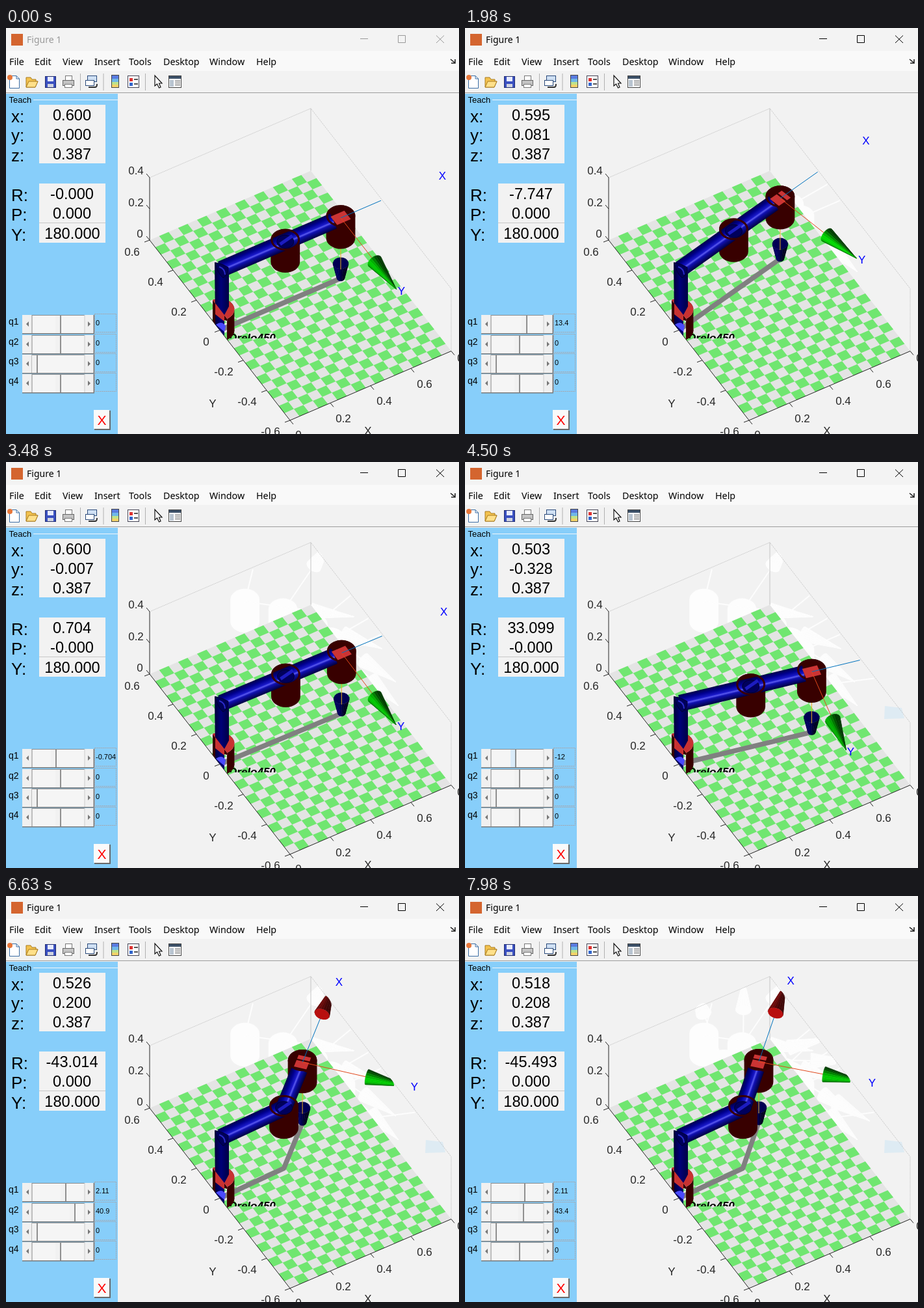
Animation of 697 by 624 pixels, one loop 8 s. Source, as an HTML page:

```html
<!DOCTYPE html>
<html lang="en">
<head>
<meta charset="utf-8">
<title>Figure 1</title>
<style>
html, body { margin: 0; width: 100%; height: 100%; overflow: hidden; background: #f2f2f2; }
svg { display: block; width: 697px; height: 624px; font-family: Arial, "Liberation Sans", sans-serif; }
.ui { font-family: "Segoe UI", "Open Sans", sans-serif; }
</style>
</head>
<body>
<svg viewBox="0 0 697 624">
  <defs>
    <linearGradient id="tube" x2="0" y2="1">
      <stop offset="0" stop-color="#000048"/>
      <stop offset=".25" stop-color="#000090"/>
      <stop offset=".48" stop-color="#1818c8"/>
      <stop offset=".56" stop-color="#5a5af0"/>
      <stop offset=".66" stop-color="#1010b0"/>
      <stop offset="1" stop-color="#000040"/>
    </linearGradient>
    <linearGradient id="column">
      <stop offset="0" stop-color="#000038"/>
      <stop offset=".45" stop-color="#000078"/>
      <stop offset="1" stop-color="#000044"/>
    </linearGradient>
    <clipPath id="plotClip"><rect x="172" y="101" width="525" height="523"/></clipPath>
    <clipPath id="nameClip"><rect x="342" y="464" width="90" height="13"/></clipPath>
  </defs>
  <rect width="697" height="624" fill="#f2f2f2"/>
  <g clip-path="url(#plotClip)">
    <g id="back"></g>
    <g id="floor"></g>
    <g id="robot"></g>
  </g>
  <g id="chrome"></g>
  <g id="panel"></g>
  <g id="live"></g>
</svg>
<script>
const LOOP = 8000, Z = 0.387, L1 = 0.325, L2 = 0.275;
const RAD = Math.PI / 180, SCALE = 358, TILT = 0.744;
const VIEW = [-0.337, -0.58, 0.743], LIGHT = [-0.85, -0.35, 0.39];
const TIP = 0.475, HEAD = 0.29, HEAD_R = 0.0335;

const layer = id => document.getElementById(id);
const project = (x, y, z = 0) => [329 + 310 * x - 180 * y, 464.5 - 133 * x - 230.8 * y - 240 * z];
const dot = (a, b) => a[0] * b[0] + a[1] * b[1] + a[2] * b[2];
const along = (o, d, t) => o.map((v, i) => v + d[i] * t);
const pts = list => list.map(p => p.map(v => v.toFixed(1)).join()).join(' ');
const poly = (list, fill, extra = '') => `<polygon points="${pts(list)}" fill="${fill}" ${extra}/>`;
const line = (list, color, width = 1, extra = '') =>
  `<polyline points="${pts(list)}" fill="none" stroke="${color}" stroke-width="${width}" ${extra}/>`;
const rect = (x, y, w, h, fill, extra = '') =>
  `<rect x="${x}" y="${y}" width="${w}" height="${h}" fill="${fill}" ${extra}/>`;
const text = (s, x, y, size, fill = '#000', anchor = 'start', extra = '') =>
  `<text x="${x}" y="${y}" font-size="${size}" fill="${fill}" text-anchor="${anchor}" ${extra}>${s}</text>`;
const path = (d, fill, extra = '') => `<path d="${d}" fill="${fill}" ${extra}/>`;

function track(keys, t) {
  let i = 1;
  while (i < keys.length && keys[i][0] <= t) i++;
  const [t0, a] = keys[i - 1], [t1, b] = keys[i] || [t0 + 1, a];
  return a + (b - a) * (t - t0) / (t1 - t0);
}

// Joint angles: [ms, degrees]. They trail the slider thumbs by one callback.
const Q1 = [[0, 0], [1440, 0], [1620, 7.747], [1890, 7.747], [1980, 13.4], [2340, 33], [2730, 33],
  [2820, 49.5], [3420, -0.704], [3570, -0.704], [4140, -36], [4260, -33.099], [4440, -33.099],
  [4500, -12], [4980, 2.113]];
const Q2 = [[0, 0], [6030, 0], [6540, 40.901], [6660, 53.4], [6870, 53.4], [7020, 57.5], [7530, 57.5],
  [7620, 75], [7860, 43.38]];
// [ms, right edge of the thumb]
const THUMB1 = [[0, 84], [1440, 84], [1680, 95], [1980, 95], [2340, 121], [2730, 121],
  [3450, 77], [3570, 77], [4110, 57], [4350, 74], [4500, 78], [4950, 92]];
const THUMB2 = [[0, 84], [6030, 84], [6600, 106], [6870, 106], [7110, 115], [7530, 115], [7950, 90]];
// White smears left behind: [ms, q1, q2]
const SMEARS = [[1620, 0, 0], [1980, 7.7, 0], [2820, 33, 0], [2940, 49.5, 0], [3300, 18, 0],
  [4500, -20, 0], [6660, 2.1, 20], [7620, 2.1, 57.5], [7740, 2.1, 75]];

function arm(q1, q2) {
  const a = q1 * RAD, b = (q1 + q2) * RAD;
  const elbow = [L1 * Math.cos(a), L1 * Math.sin(a), Z];
  const dirX = [Math.cos(b), Math.sin(b), 0];
  return { q1, q2, yaw: q1 + q2, elbow, tool: along(elbow, dirX, L2), dirX, dirY: [dirX[1], -dirX[0], 0] };
}

// The robot is redrawn at a coarse rate
function poseAt(t) {
  const s = Math.max(0, Math.floor((t - 60) / 120) * 120 + 60);
  return arm(track(Q1, s), track(Q2, s));
}

// Distance along d until the axes box ends
function reach(o, d, limit = TIP) {
  const lo = [0, -0.6, 0], hi = [0.8, 0.6, 0.45];
  return d.reduce((m, v, i) => Math.abs(v) < 1e-6 ? m : Math.min(m, ((v > 0 ? hi : lo)[i] - o[i]) / v), limit);
}

function cone(o, d, rgb, flat) {
  if (reach(o, d) <= HEAD) return '';
  const u = d[2] ? [1, 0, 0] : [-d[1], d[0], 0], w = d[2] ? [0, 1, 0] : [0, 0, 1], n = 18;
  const normal = k => u.map((v, i) => v * Math.cos(k * 2 * Math.PI / n) + w[i] * Math.sin(k * 2 * Math.PI / n));
  const apex = along(o, d, TIP), center = along(o, d, HEAD);
  const rim = k => along(center, normal(k), HEAD_R);
  const end = k => {
    const a = rim(k), side = apex.map((v, i) => v - a[i]);
    return along(a, side, Math.max(0, reach(a, side, 1)));
  };
  const tone = s => flat || `rgb(${rgb.map(v => Math.round(v * s))})`;
  let out = '';
  for (let k = 0; k < n; k++) {
    const m = normal(k + 0.5);
    if (dot(m, VIEW) < -0.15) continue;
    const c = tone(0.25 + 0.75 * Math.max(0, dot(m, LIGHT)) ** 2);
    out += poly([rim(k), rim(k + 1), end(k + 1), end(k)].map(p => project(...p)), c, `stroke="${c}" stroke-width=".5"`);
  }
  if (dot(d, VIEW) < 0) out += poly([...Array(n).keys()].map(k => project(...rim(k))), tone(0.75));
  return out;
}

const RIM = 22.4, MAROON = '#380000';
const rimRing = ([x, y], color, width) =>
  `<ellipse cx="${x}" cy="${y - 3}" rx="${RIM - width / 2}" ry="${RIM * TILT - width / 2}" fill="none" stroke="${color}" stroke-width="${width}"/>`;

function cylinder([x, y], fill) {
  const ry = RIM * TILT, top = y - 3, low = y + 31;
  return path(`M${x - RIM} ${top}A${RIM} ${ry} 0 0 1 ${x + RIM} ${top}V${low}A${RIM} ${ry} 0 0 1 ${x - RIM} ${low}Z`, fill);
}

function tube(a, b, cut = 0) {
  const dx = b[0] - a[0], dy = b[1] - a[1];
  return `<g transform="translate(${a}) rotate(${Math.atan2(dy, dx) / RAD})">` +
    rect(0, -12.7, Math.max(0, Math.hypot(dx, dy) - cut), 25.4, 'url(#tube)') + '</g>';
}

function smear(q1, q2) {
  const { tool, dirX, dirY } = arm(q1, q2), c = '#fdfdfd';
  return cylinder(project(...tool), c) + cone(tool, dirX, 0, c) + cone(tool, dirY, 0, c) +
    [dirX, dirY].map(d => line([project(...tool), project(...along(tool, d, reach(tool, d)))], c, 2)).join('');
}

function drawBack(t) {
  let out = SMEARS.filter(s => t >= s[0]).map(s => smear(s[1], s[2])).join('');
  if (t >= 4260) out += poly([[646, 375], [672, 378], [676, 394], [645, 395]], '#deebf3');
  const wall = [[0, 0.6, 0.4], [0.8, 0.6, 0.4], [0.8, -0.6, 0.4], [0.8, -0.6, 0]].map(p => project(...p));
  return out + line(wall, '#bdbdbd', 1, 'stroke-dasharray="1 1"') +
    line([project(0.8, 0.6, 0.4), project(0.8, 0.6, 0)], '#c4c4c4');
}

function drawFloor() {
  const cols = 17, rows = 25, w = 0.8 / cols, h = 1.2 / rows;
  let out = poly([project(0, 0.6), project(0.8, 0.6), project(0.8, -0.6), project(0, -0.6)], '#e4e4e4'), d = '';
  for (let i = 0; i < cols; i++) for (let j = 1 - i % 2; j < rows; j += 2) {
    const x = i * w, y = 0.6 - j * h;
    d += 'M' + pts([project(x, y), project(x + w, y), project(x + w, y - h), project(x, y - h)]) + 'Z';
  }
  out += path(d, '#70e670');
  const ink = '#262626';
  out += line([project(0, 0.6, 0.4), project(0, 0.6), project(0, -0.6), project(0.8, -0.6)], ink);
  const label = (s, x, y) => text(s, x, y + 6, 17, ink, 'middle');
  [0.6, 0.4, 0.2, 0, -0.2, -0.4, -0.6].forEach((v, i) => {
    const [x, y] = project(0, v);
    out += line([[x, y], [x - 8, y + 3]], ink);
    out += label(v, [194, 230, 266, 308, 335, 371, 407][i], 344 + 46 * i);
  });
  [0, 0.2, 0.4, 0.6, 0.8].forEach((v, i) => {
    const [x, y] = project(v, -0.6);
    out += line([[x, y], [x + 5, y + 6]], ink);
    out += label(v, [450, 519, 582, 644, 706][i], [625, 600, 573, 547, 507][i]);
  });
  [0, 0.2, 0.4].forEach((v, i) => {
    const [x, y] = project(0, 0.6, v);
    out += line([[x, y], [x - 5, y - 6]], ink) + label(v, i ? 200 : 206, 316 - 48.5 * i);
  });
  return out + label('Y', 318, 577) + label('X', 557, 619);
}

function drawBase() {
  const half = (r, y) => `M${329 - 180 * r} ${y - 230.8 * r}A${SCALE * r} ${SCALE * r * TILT} 0 0 1 ${329 + 180 * r} ${y + 230.8 * r}`;
  return path(half(0.0625, 464.5) + 'V447L318 418V450Z', MAROON) +
    path(half(0.0625, 432.5) + 'L340 479A22.4 16.7 0 0 0 351.4 464.5V432Z', MAROON) +
    path(half(0.0625, 432.5) + 'Z', '#c83232') +
    poly([[321, 360], [343, 364], [343, 428], [336, 441], [336, 473], [322, 456]], 'url(#column)') +
    poly([[318, 420], [322, 425], [322, 456], [318, 450]], MAROON) +
    poly([[322, 423], [336, 441], [336, 451], [322, 440]], '#c83232') +
    path('M323 456Q332 449 338 458L336 467Z', '#4a4aff');
}

function drawRobot(p) {
  const { elbow, tool, dirX, dirY } = p, down = [0, 0, -1];
  const root = project(0, 0, Z), E = project(...elbow), T = project(...tool);
  const axis = (d, c) => line([T, project(...along(tool, d, reach(tool, d)))], c);
  const patch = (x0, x1) => poly([[x0, -1], [x1, -1], [x1, 1], [x0, 1]].map(([a, b]) =>
    project(...along(along(tool, dirX, a), dirY, b * 0.028))), '#cb3434');
  const tag = (s, d) => {
    const [x, y] = project(...along(tool, d, 0.485));
    return text(s, x + 6, y + 6, 17, '#00f', 'middle');
  };
  return line([project(0, 0), project(elbow[0], elbow[1]), project(tool[0], tool[1])], '#808080', 7.5, 'stroke-linejoin="round"') +
    text('Drelo450', 343, 482, 17, '#000', 'start', 'font-weight="bold" font-style="italic" clip-path="url(#nameClip)"') +
    drawBase() +
    cone(tool, down, [0, 0, 110]) +
    line([T, project(...along(tool, down, 0.33))], '#edb120') +
    cylinder(T, MAROON) + cylinder(E, MAROON) +
    tube([root[0] + 2, root[1] - 1], E) + tube(E, T, 12) +
    `<ellipse cx="${E[0]}" cy="${E[1]}" rx="13" ry="10" fill="#00005c" stroke="#000030"/>` +
    path(`M${E[0] - 8} ${E[1] + 4}L${E[0] + 11} ${E[1] - 9}`, 'none', 'stroke="#1c1cc0" stroke-width="5"') +
    rimRing(E, MAROON, 3) + rimRing(T, MAROON, 3) +
    path('M322 361Q333 362 342 368Q343 379 334 384Q326 378 322 361Z', '#00005a', 'stroke="#000030"') +
    path('M328 367Q337 370 337 379', 'none', 'stroke="#2a2ac8" stroke-width="2"') +
    (p.yaw > 1 ? patch(-0.034, 0.006) + patch(0.014, 0.036) : patch(-0.034, 0.034)) +
    axis(dirX, '#0072bd') + axis(dirY, '#e0481c') +
    cone(tool, dirX, [245, 20, 20]) + cone(tool, dirY, [0, 225, 0]) +
    tag('X', dirX) + tag('Y', dirY);
}

function drawChrome() {
  const box = (x, y, w, h, fill, edge = '#555') => rect(x, y, w, h, fill, `stroke="${edge}"`);
  let out = rect(0, 0, 697, 35, '#f3f3f3') + rect(0, 35, 697, 31, '#f9f9f9') + rect(0, 66, 697, 34, '#f2f2f2') +
    rect(0, 99, 697, 1, '#9c9c9c') + rect(8, 9, 18, 18, '#d4652f');
  ['File', 'Edit', 'View', 'Insert', 'Tools', 'Desktop', 'Window', 'Help'].forEach((s, i) => {
    out += text(s, [5, 44, 87, 136, 189, 242, 313, 385][i], 57, 14.3, '#000', 'start', 'class="ui"');
  });
  out += path('M684 48L690 53M691 48V54H685', 'none', 'stroke="#222" stroke-width="1.6"');
  [114, 149.5, 214].forEach(x => out += rect(x, 70, 1, 26, '#b0b0b0'));
  out += path('M5.5 73.5H16L20.5 78V92.5H5.5Z', '#fff', 'stroke="#3b6ea5"') + path('M16 73.5V78H20.5', 'none', 'stroke="#3b6ea5"') +
    `<circle cx="6" cy="76" r="4" fill="#e8773a"/>`;
  out += path('M31 91V76H38L40 79H46V82H49L45 91Z', '#f3c24f', 'stroke="#a87b1d"') + path('M35 82H49L45 91H31Z', '#ffe08a', 'stroke="#a87b1d"');
  out += box(60.5, 74.5, 16, 17, '#3a50c0', '#202c70') + rect(64, 75, 9, 7, '#e8ecff') + rect(64, 86, 9, 5, '#d0d4e0');
  out += box(91.5, 73.5, 10, 8, '#fff', '#777') + box(87.5, 80.5, 17, 8, '#c4c4c4', '#666') + box(90.5, 86.5, 11, 5, '#fff', '#777');
  out += box(125.5, 73.5, 14, 9, '#cfe0f4', '#2a4a7a') + box(122.5, 80.5, 13, 8, '#fff', '#2a4a7a') +
    path('M127 91H137Q140 91 140 86', 'none', 'stroke="#333" stroke-width="2"');
  out += box(162.5, 72.5, 11, 19, '#6fb7e8', '#444') + rect(163, 73, 10, 5, '#5a7be0') + rect(163, 83, 10, 4, '#bfe28a') + rect(163, 87, 10, 4, '#f4d36a');
  out += box(187.5, 73.5, 17, 18, '#fff', '#445') + rect(190, 77, 5, 5, '#d33') + rect(190, 84, 5, 5, '#36c') +
    rect(197, 78, 6, 2, '#555') + rect(197, 85, 6, 2, '#555');
  out += path('M229 73V89L232.5 86L235.5 92L238 91L235.5 85H240Z', '#fff', 'stroke="#111" stroke-width="1.2"');
  out += box(250.5, 73.5, 19, 18, '#fff', '#444') + rect(251, 74, 18, 4, '#3c5068') + rect(252, 80, 6, 10, '#b8c4d0') +
    [81, 84, 87].map(y => rect(260, y, 8, 1, '#555')).join('');
  return out;
}

function drawPanel() {
  let out = rect(0, 101, 172, 523, '#87cefa') + rect(42, 110, 130, 1, '#f0f6fa') + text('Teach', 4.5, 115, 13);
  ['x:', 'y:', 'z:', 'R:', 'P:', 'Y:'].forEach((s, i) => out += text(s, 8, [145, 174, 205, 266, 296, 327][i], 26));
  out += rect(51, 118, 102, 90, '#f2f2f2') + rect(51, 239, 102, 91, '#f2f2f2') + rect(51, 299, 102, 1, '#c8c8c8');
  out += rect(136, 588, 25, 30, '#6a6a6a') + rect(135, 587, 24, 29, '#fafafa') + text('X', 147.5, 610, 21, '#f00', 'middle');
  return out;
}

function slider(i, thumb, value, hot) {
  const y = [441, 472, 502, 532][i], edge = '#7c7c7c';
  return text('q' + (i + 1), 4, y + 15, 14) +
    rect(25, y, 111, 29, '#f0f0f0') + rect(25, y + 28, 111, 1.5, edge) + rect(134.5, y, 1.5, 29, edge) +
    rect(40, y + 1, 81, 27, '#f5f5f5') + rect(39.5, y, 1, 28, '#888') + rect(40, y, 81, 1, '#8c8c8c') + rect(120.5, y, 1, 28, '#ccc') +
    rect(thumb - 8, y + 1, 8, 27, hot ? '#d9ebf9' : '#f1f1f1') + rect(thumb - 0.7, y + 1, 1.4, 27, '#666') +
    poly([[31, y + 14], [35, y + 10], [35, y + 18]], '#777') + poly([[130, y + 14], [126, y + 10], [126, y + 18]], '#777') +
    rect(136.5, y - 1.5, 33, 28, 'none', 'stroke="#a8a4a8" stroke-dasharray="2 1"') +
    text(Number(value.toPrecision(3)), 138, y + 16, 11);
}

function drawLive(t, p) {
  const ink = t >= 1440 ? '#000' : '#999';
  let out = text('Figure 1', 32, 23, 14, ink, 'start', 'class="ui"') +
    path('M545 16.5H557M603.5 11.5H614.5V22.5H603.5ZM662 11.5L674 23M674 11.5L662 23', 'none', `stroke="${ink}"`);
  // The readouts are refreshed a moment after the picture
  const r = poseAt(t - 60), f = v => v.toFixed(3);
  const values = [f(r.tool[0]), f(r.tool[1]), f(Z), r.yaw === 0 ? '-0.000' : f(-r.yaw), r.yaw < 0 ? '-0.000' : '0.000', '180.000'];
  values.forEach((s, i) => out += text(s, i < 5 ? 101.5 : 102, [142, 172, 202, 263, 293, 324][i], 23.6, '#000', 'middle'));
  return out + slider(0, track(THUMB1, t), p.q1, t >= 4380 && t < 4560) + slider(1, track(THUMB2, t), p.q2) +
    slider(2, 48, 0) + slider(3, 84, 0);
}

layer('floor').innerHTML = drawFloor();
layer('chrome').innerHTML = drawChrome();
layer('panel').innerHTML = drawPanel();

function render(t) {
  const p = poseAt(t);
  layer('back').innerHTML = drawBack(t);
  layer('robot').innerHTML = drawRobot(p);
  layer('live').innerHTML = drawLive(t, p);
}

const start = performance.now();
function tick() {
  render((performance.now() - start) % LOOP);
  requestAnimationFrame(tick);
}
tick();
</script>
</body>
</html>
```
